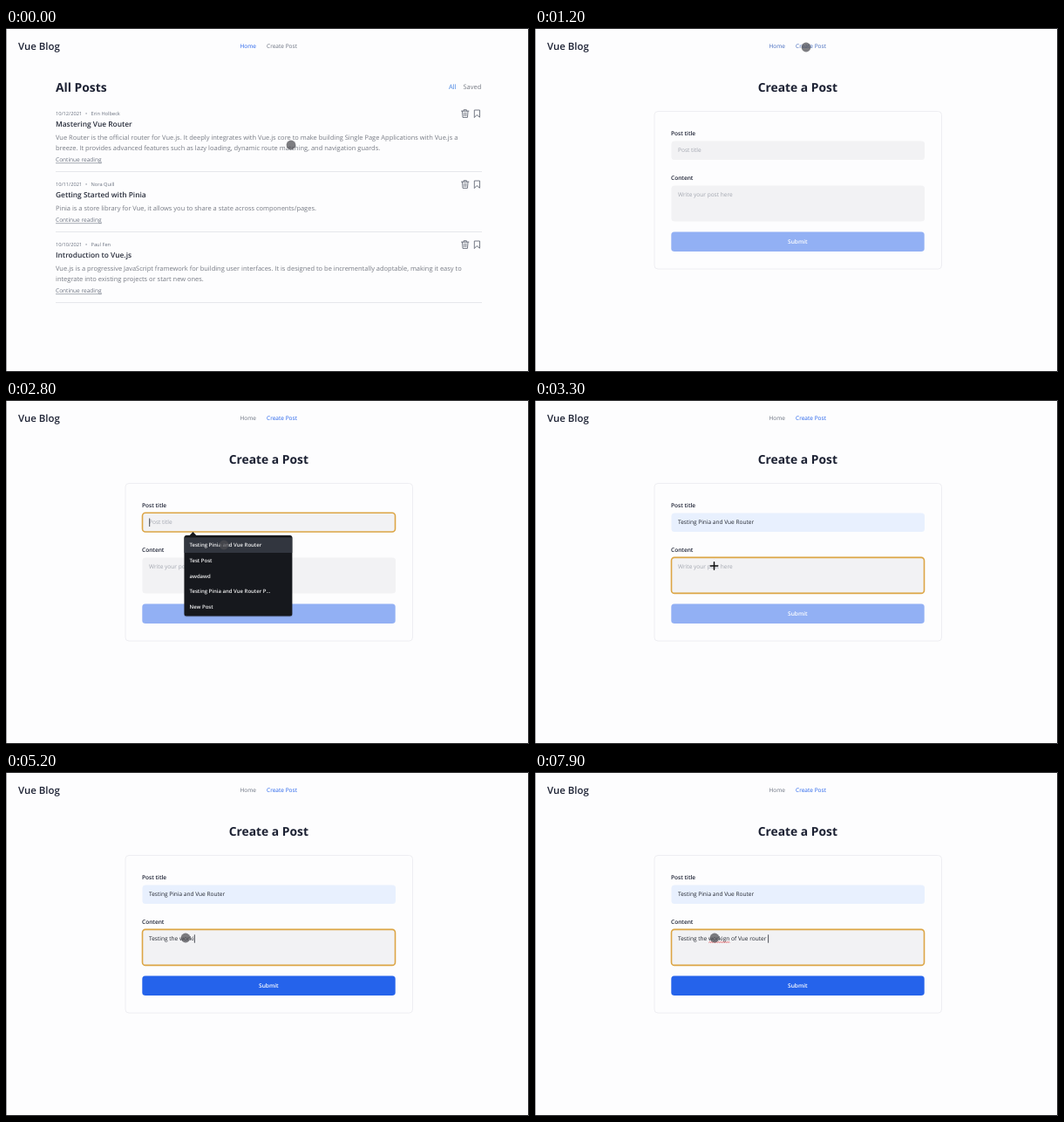
Recreate the animation shown at these times as an HTML page. Size 600 by 394 pixels, loop 8000 ms.

```html
<!DOCTYPE html>
<html lang="en">
<head>
<meta charset="utf-8">
<title>Vue Blog</title>
<style>
  html, body { margin: 0; width: 100%; height: 100%; overflow: hidden; background: #fdfdfe; }
  svg { display: block; width: 600px; height: 394px; }
  text { font: 6.55px "Open Sans", "Noto Sans", sans-serif; fill: #6b7280; white-space: pre; text-rendering: geometricPrecision; }
  .brand { font-size: 11.4px; font-weight: 600; fill: #1c2133; }
  .heading { font-size: 13.85px; font-weight: 700; fill: #1c2133; }
  .title { font-size: 8.37px; font-weight: 600; fill: #272c3a; }
  .body { font-size: 7.48px; fill: #777b84; }
  .meta { font-size: 5.7px; }
  .label { font-weight: 600; fill: #1c2133; }
  .hint { fill: #a3a7b0; }
  .value { fill: #22262f; }
  .submit { font-weight: 600; fill: #fff; }
  .option { font-size: 6px; font-weight: 600; fill: #f1f1f2; }
  .center { text-anchor: middle; }
  .icon { fill: none; stroke: #5d6370; stroke-width: .85; stroke-linejoin: round; stroke-linecap: round; }
  .field { fill: #f2f2f4; }
  .ring { fill: none; stroke: #dca545; stroke-width: 1.6; }
  .caret { stroke: #22262f; stroke-width: .8; }
</style>
</head>
<body>
<svg viewBox="0 0 600 394">
  <text class="brand" x="14" y="25.4">Vue Blog</text>
  <text id="home" x="268.5" y="23">Home</text>
  <text id="create" x="299" y="23">Create Post</text>

  <g id="list">
    <text class="heading" x="57" y="72.7">All Posts</text>
    <text class="body" x="508" y="70.2" style="fill:#3f7fe0">All</text>
    <text class="body" x="524.5" y="70.2">Saved</text>
  </g>

  <g id="form">
    <text class="heading center" x="301.3" y="72.7">Create a Post</text>
    <rect x="137" y="95.5" width="329.5" height="180.5" rx="4" fill="none" stroke="#eeeef2"/>
    <text class="label" x="156" y="122.8">Post title</text>
    <rect id="titleBox" class="field" x="156.5" y="129.5" width="290.5" height="21.5" rx="3.5"/>
    <text id="titleText" x="164" y="142.4"></text>
    <path id="titleCaret" class="caret" d="M164.7 135.5v9.5"/>
    <rect id="titleRing" class="ring" x="156.5" y="129.2" width="290" height="21.8" rx="3.5"/>
    <text class="label" x="156" y="173.8">Content</text>
    <rect class="field" x="156.5" y="180.5" width="290.5" height="41" rx="3.5"/>
    <text id="contentText" x="164" y="193.4"></text>
    <path id="squiggle" fill="none" stroke="#e0393e" stroke-width=".8"/>
    <path id="contentCaret" class="caret" d="M.6 186.3v9.4"/>
    <rect id="contentRing" class="ring" x="156.5" y="180.4" width="290" height="41" rx="3.5"/>
    <rect id="button" x="156.3" y="233.5" width="290.4" height="22.5" rx="3.5"/>
    <text class="submit center" x="301.3" y="247.1">Submit</text>
  </g>

  <g id="popup">
    <rect x="204" y="155.5" width="125" height="93" rx="3" fill="#000" opacity=".15"/>
    <path d="M210.3 155.5l4.2-4.5 4.2 4.5z" fill="#16181d"/>
    <rect x="204.5" y="155" width="123.8" height="92.5" rx="2.5" fill="#16181d"/>
    <rect id="highlight" x="204.5" y="157.5" width="123.8" height="17.5" fill="#32363f"/>
  </g>

  <circle id="pointer" r="5.4" fill="#4b4b50" fill-opacity=".72"/>
  <path id="cross" d="M205.5 185.8v8.4M201.3 190h8.4" stroke="#111" stroke-width="1.5" stroke-linecap="round"/>

  <path d="M.5 0v394" stroke="#a5a5a8"/>
  <path d="M0 .5h599.5v393H0" fill="none" stroke="#1d1d20"/>
</svg>
<script>
const el = Object.fromEntries([...document.querySelectorAll('[id]')].map(e => [e.id, e]));

const posts = [
  { y: 98, date: '10/12/2021', author: 'Erin Holbeck', title: 'Mastering Vue Router', lines: [
    'Vue Router is the official router for Vue.js. It deeply integrates with Vue.js core to make building Single Page Applications with Vue.js a',
    'breeze. It provides advanced features such as lazy loading, dynamic route matching, and navigation guards.'] },
  { y: 179, date: '10/11/2021', author: 'Nora Quill', title: 'Getting Started with Pinia', lines: [
    'Pinia is a store library for Vue, it allows you to share a state across components/pages.'] },
  { y: 248, date: '10/10/2021', author: 'Paul Fen', title: 'Introduction to Vue.js', lines: [
    'Vue.js is a progressive JavaScript framework for building user interfaces. It is designed to be incrementally adoptable, making it easy to',
    'integrate into existing projects or start new ones.'] }
];
const text = (cls, x, y, s) => `<text class="${cls}" x="${x}" y="${y}">${s}</text>`;

el.list.innerHTML += posts.map(({ y, date, author, title, lines }) => {
  const end = y + 29 + 12 * lines.length;
  return text('meta', 57, y + 2.1, date) + text('meta', 91, y + 2.1, '•') + text('meta', 97.5, y + 2.1, author)
    + text('title', 57, y + 15.4, title)
    + lines.map((s, i) => text('body', 57, y + 29.7 + 12 * i, s)).join('')
    + text('', 57, end + 2.2, 'Continue reading')
    + `<path d="M57 ${end + 3.7}h53" stroke="#6b7280" stroke-width=".6"/>
       <path d="M57 ${end + 13.5}h489" stroke="#e6e7eb"/>
       <path class="icon" transform="translate(522.5 ${y - 4.6})"
         d="M0 1.7h8.4M2.6 1.5V.3h3.2v1.2M.9 1.9l.6 7.1h5.4l.6-7.1M3.2 3.6v3.6M5.2 3.6v3.6"/>
       <path class="icon" transform="translate(537.3 ${y - 4.4})" d="M0 8.6V.4h6.2v8.2L3.1 6.2z"/>`;
}).join('');

const postTitle = 'Testing Pinia and Vue Router';
el.popup.innerHTML += [postTitle, 'Test Post', 'awdawd', postTitle + ' P…', 'New Post']
  .map((s, i) => text('option', 210.5, 168.3 + 17.7 * i, s)).join('');
el.highlight = document.getElementById('highlight');

// Typing: a steady run, then bursts with pauses
const content = 'Testing the workign of Vue router ';
const keyTimes = [...Array.from({ length: 19 }, (_, i) => 3600 + 100 * i),
  5800, 6000, 6100, 6300, 6600, 6700, 6800, 6900, 7200, 7350, 7400, 7450, 7500, 7700, 7900];

// Pointer stops: time, x, y
const stops = [[100, 327, 134], [1000, 311, 22], [1400, 311, 22], [2200, 254, 149],
  [2550, 254, 149], [2800, 250, 166], [2950, 250, 166], [3200, 206, 190]];

const GRAY = [107, 114, 128], BLUE = [37, 99, 235], PALE = [146, 176, 244];
const progress = (t, from, to) => Math.min(1, Math.max(0, (t - from) / (to - from)));
const ease = p => p * p * (3 - 2 * p);
const lerp = (a, b, p) => a + (b - a) * p;
const mix = (a, b, p) => `rgb(${a.map((v, i) => Math.round(lerp(v, b[i], p)))})`;
const show = (e, on) => { e.style.display = on ? '' : 'none'; };
const write = (e, s, cls) => { e.textContent = s; e.setAttribute('class', cls); };

function pointerAt(t) {
  const next = stops.findIndex(s => s[0] > t);
  if (next === 0) return stops[0].slice(1);
  if (next < 0) return stops.at(-1).slice(1);
  const [t0, x0, y0] = stops[next - 1], [t1, x1, y1] = stops[next];
  const p = ease(progress(t, t0, t1));
  return [lerp(x0, x1, p), lerp(y0, y1, p)];
}

function draw(t) {
  const onForm = t >= 1150, filled = t >= 2900, inContent = t >= 3200;
  show(el.list, !onForm);
  show(el.form, onForm);
  el.home.style.fill = mix(BLUE, GRAY, progress(t, 1130, 1300));
  el.create.style.fill = mix(GRAY, BLUE, progress(t, 1100, 1280));

  const choosing = t >= 2400 && !filled;
  show(el.popup, choosing);
  show(el.highlight, t >= 2700);
  show(el.titleCaret, choosing);
  show(el.titleRing, t >= 2400 && !inContent);
  write(el.titleText, filled ? postTitle : 'Post title', filled ? 'value' : 'hint');
  el.titleBox.style.fill = filled ? '#e8f0fe' : '';

  const typed = content.slice(0, keyTimes.filter(k => k <= t).length);
  write(el.contentText, typed || 'Write your post here', typed ? 'value' : 'hint');
  show(el.contentRing, inContent);
  show(el.contentCaret, typed);
  show(el.squiggle, typed.length > 19);
  if (typed) el.contentCaret.setAttribute('transform', `translate(${164 + el.contentText.getComputedTextLength()})`);
  el.button.style.fill = mix(PALE, BLUE, progress(t, 3600, 3750));

  const moving = t >= 3200 && t < 3500;
  show(el.cross, moving);
  show(el.pointer, !moving);
  el.pointer.setAttribute('transform', `translate(${pointerAt(t)})`);
}

el.squiggle.setAttribute('d', 'M199.4 195.4' + 'l1 -.9l1 .9'.repeat(12));

function frame() {
  draw(performance.now() % 8000);
  requestAnimationFrame(frame);
}
frame();
</script>
</body>
</html>
```
